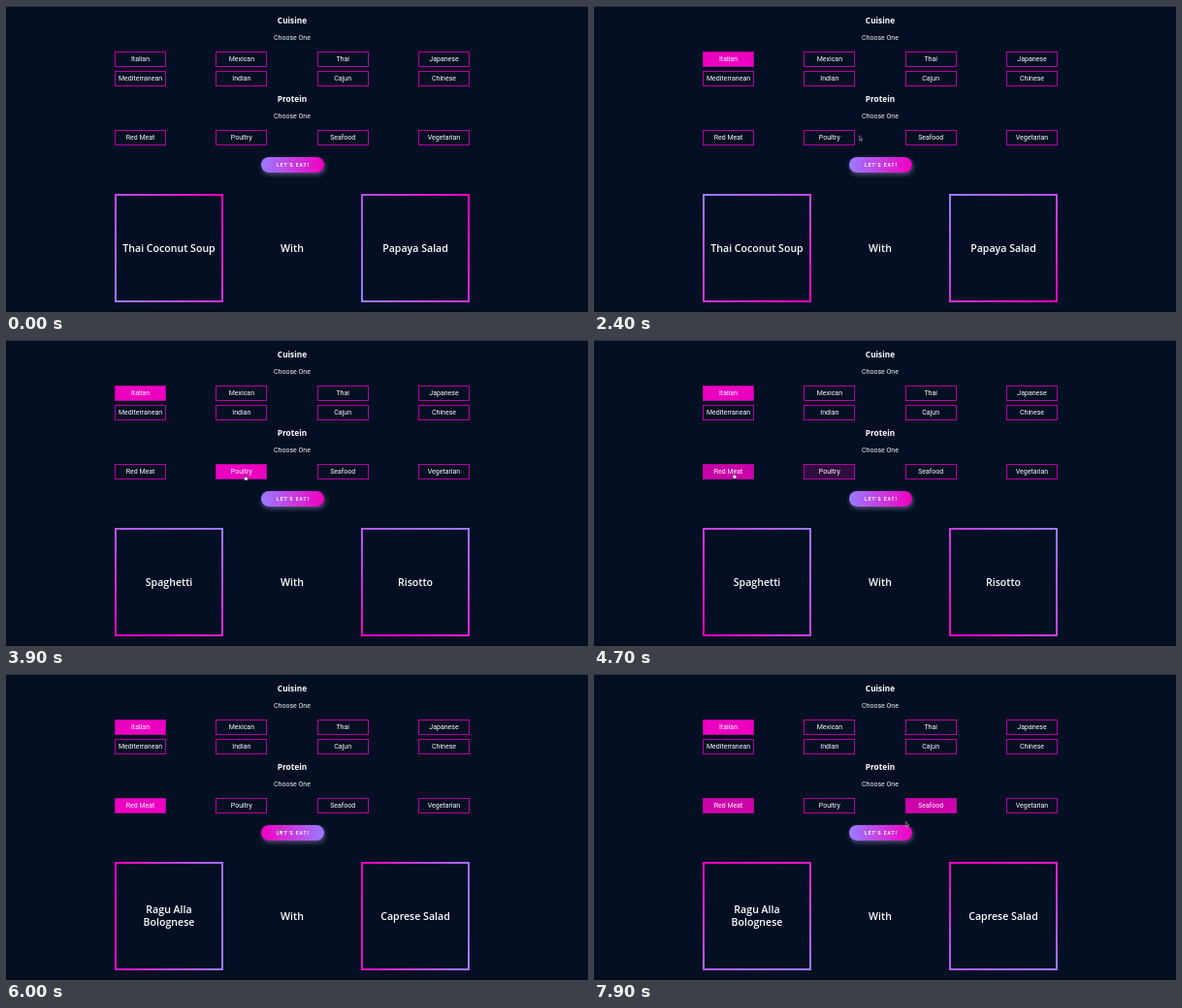
Write an HTML page that moves like this. It is 600 px wide and 316 px high and loops after 8000 ms.

```html
<!DOCTYPE html>
<html lang="en">
<head>
<meta charset="utf-8">
<title>Dinner picker</title>
<style>
@property --angle { syntax: "<angle>"; inherits: false; initial-value: 60deg; }
:root { --violet: #9a7bff; --pink: #f200c1; --fill: #ec00c0; --loop: 8s infinite; }
* { box-sizing: border-box; }
html, body { margin: 0; width: 100%; height: 100%; overflow: hidden; background: #040f23; }
body { position: relative; color: #fff; font: 7px Roboto, sans-serif; }
body > * { position: absolute; margin: 0; }

.edge { left: 0; width: 600px; }
.top { top: 0; height: 1px; background: #2a303c; }
.bottom { top: 314px; height: 2px; background: #060b18; }

h2, p { left: 112px; width: 366px; height: 16px; line-height: 16px; text-align: center; }
h2, .card, .with { font-family: "Open Sans", sans-serif; }
h2 { font-size: 8.3px; font-weight: 700; }
p { color: #f0f1f4; }

.grid {
  left: 112px; width: 366px; display: grid;
  grid-template-columns: repeat(4, 53px); grid-auto-rows: 16px;
  justify-content: space-between; row-gap: 4px;
}
.grid span {
  display: flex; align-items: center; justify-content: center;
  border: 1px solid #b3049f; white-space: nowrap;
}

.eat {
  left: 263px; top: 156px; width: 65px; height: 16px; border-radius: 8px;
  font-size: 5px; font-weight: 700; letter-spacing: 1px;
  line-height: 16px; text-align: center; text-indent: 1px;
  background: linear-gradient(90deg, var(--violet), var(--pink) 50%, var(--violet)) 0 0 / 200% 100%;
  box-shadow: 1px 2px 5px rgba(150, 140, 190, .55);
  animation: eat var(--loop);
}

.card {
  top: 194px; width: 112px; height: 112px; border: 2.5px solid;
  border-image: linear-gradient(var(--angle), var(--violet), var(--pink)) 1;
  animation: turn 8s steps(80) infinite;
}
.card b, .with {
  position: absolute; inset: 0; display: flex; align-items: center; justify-content: center;
  font-size: 10.6px; font-weight: 600; line-height: 13px; text-align: center;
}
.with { inset: auto; left: 245px; top: 194px; width: 100px; height: 112px; }
.first { animation: first var(--loop) step-end; }
.second { animation: second var(--loop) step-end; }
.third { animation: third var(--loop) step-end; }

.italian { animation: italian var(--loop); }
.meat { animation: meat var(--loop); }
.poultry { animation: poultry var(--loop); }
.seafood { animation: seafood var(--loop); }

.cursor { left: 0; top: 0; width: 6px; height: 7px; animation: move var(--loop), seen var(--loop) step-end; }
.cursor svg { position: absolute; left: 0; top: 0; width: 6px; height: 7px; overflow: visible; }
.hand { animation: hand var(--loop) step-end; }
.arrow { animation: arrow var(--loop) step-end; }

@keyframes turn { from { --angle: 60deg; } to { --angle: 348deg; } }

@keyframes first { 0% { opacity: 1; } 36.25%, 100% { opacity: 0; } }
@keyframes second { 0% { opacity: 0; } 36.25% { opacity: 1; } 72.5%, 100% { opacity: 0; } }
@keyframes third { 0% { opacity: 0; } 72.5%, 100% { opacity: 1; } }

@keyframes italian {
  0%, 16.25% { background: #ec00c000; }
  18.75%, 23.75% { background: #ec00c033; }
  26.25%, 100% { background: var(--fill); }
}
@keyframes poultry {
  0%, 45% { background: #ec00c000; }
  46.25% { background: #ec00c033; }
  48.75%, 57.5% { background: var(--fill); }
  60%, 100% { background: #ec00c000; }
}
@keyframes meat {
  0%, 55% { background: #ec00c000; }
  56.25%, 57.5% { background: #ec00c033; }
  60%, 96.25% { background: var(--fill); }
  98.75%, 100% { background: #ec00c0dc; }
}
@keyframes seafood {
  0%, 87.5% { background: #ec00c000; }
  90%, 95% { background: #ec00c033; }
  98.75%, 100% { background: #ec00c0dc; }
}
@keyframes eat {
  0%, 33.75% { background-position: 0 0; }
  37.5%, 41.25% { background-position: 100% 0; }
  45%, 67.5% { background-position: 0 0; }
  71.25%, 82.5% { background-position: 100% 0; }
  86.25%, 100% { background-position: 0 0; }
}

@keyframes move {
  0%, 6.25% { transform: translate(225px, 170px); }
  11.25% { transform: translate(185px, 83px); }
  16.25%, 26.25% { transform: translate(152px, 54px); }
  35%, 40% { transform: translate(319.5px, 164px); }
  46.25%, 51.25% { transform: translate(244.5px, 139px); }
  56.25%, 60% { transform: translate(142px, 137px); }
  66.25% { transform: translate(274px, 153px); }
  68.75%, 82.5% { transform: translate(280.5px, 159px); }
  90%, 95% { transform: translate(345px, 136px); }
  98.75%, 100% { transform: translate(321px, 152px); }
}
@keyframes seen { 0% { opacity: 0; } 6.25%, 100% { opacity: 1; } }
@keyframes hand {
  0% { opacity: 0; } 15% { opacity: 1; }
  27.5% { opacity: 0; } 33.75% { opacity: 1; }
  41.25% { opacity: 0; } 45% { opacity: 1; }
  52.5% { opacity: 0; } 55% { opacity: 1; }
  61.25% { opacity: 0; } 67.5% { opacity: 1; }
  83.75% { opacity: 0; } 88.75% { opacity: 1; }
  97.5%, 100% { opacity: 0; }
}
@keyframes arrow {
  0% { opacity: 1; } 15% { opacity: 0; }
  27.5% { opacity: 1; } 33.75% { opacity: 0; }
  41.25% { opacity: 1; } 45% { opacity: 0; }
  52.5% { opacity: 1; } 55% { opacity: 0; }
  61.25% { opacity: 1; } 67.5% { opacity: 0; }
  83.75% { opacity: 1; } 88.75% { opacity: 0; }
  97.5%, 100% { opacity: 1; }
}
</style>
</head>
<body>
<div class="edge top"></div>
<div class="edge bottom"></div>

<h2 style="top:7px">Cuisine</h2>
<p style="top:25px">Choose One</p>
<div class="grid" style="top:47px">
  <span class="italian">Italian</span><span>Mexican</span><span>Thai</span><span>Japanese</span>
  <span>Mediterranean</span><span>Indian</span><span>Cajun</span><span>Chinese</span>
</div>

<h2 style="top:88px">Protein</h2>
<p style="top:106px">Choose One</p>
<div class="grid" style="top:128px">
  <span class="meat">Red Meat</span><span class="poultry">Poultry</span><span class="seafood">Seafood</span><span>Vegetarian</span>
</div>

<div class="eat">LET'S EAT!</div>

<div class="card" style="left:112px">
  <b class="first">Thai Coconut Soup</b>
  <b class="second">Spaghetti</b>
  <b class="third">Ragu Alla<br>Bolognese</b>
</div>
<div class="with">With</div>
<div class="card" style="left:366px">
  <b class="first">Papaya Salad</b>
  <b class="second">Risotto</b>
  <b class="third">Caprese Salad</b>
</div>

<div class="cursor">
  <svg class="hand" viewBox="0 0 6 7"><path d="M1.4 .4 2.2.4 2.5 2.4 4.9 2.9 4.7 5 4.1 6.1H2.1L.5 3.7 1 3.3 1.7 3.7Z" fill="#fff" stroke="#111" stroke-width=".4"/></svg>
  <svg class="arrow" viewBox="0 0 6 7"><path d="M.4 .4V5.2L1.5 4.2 2.3 6 3 5.7 2.2 4H3.7Z" fill="#000" stroke="#d8d8e0" stroke-width=".5"/></svg>
</div>
</body>
</html>
```
